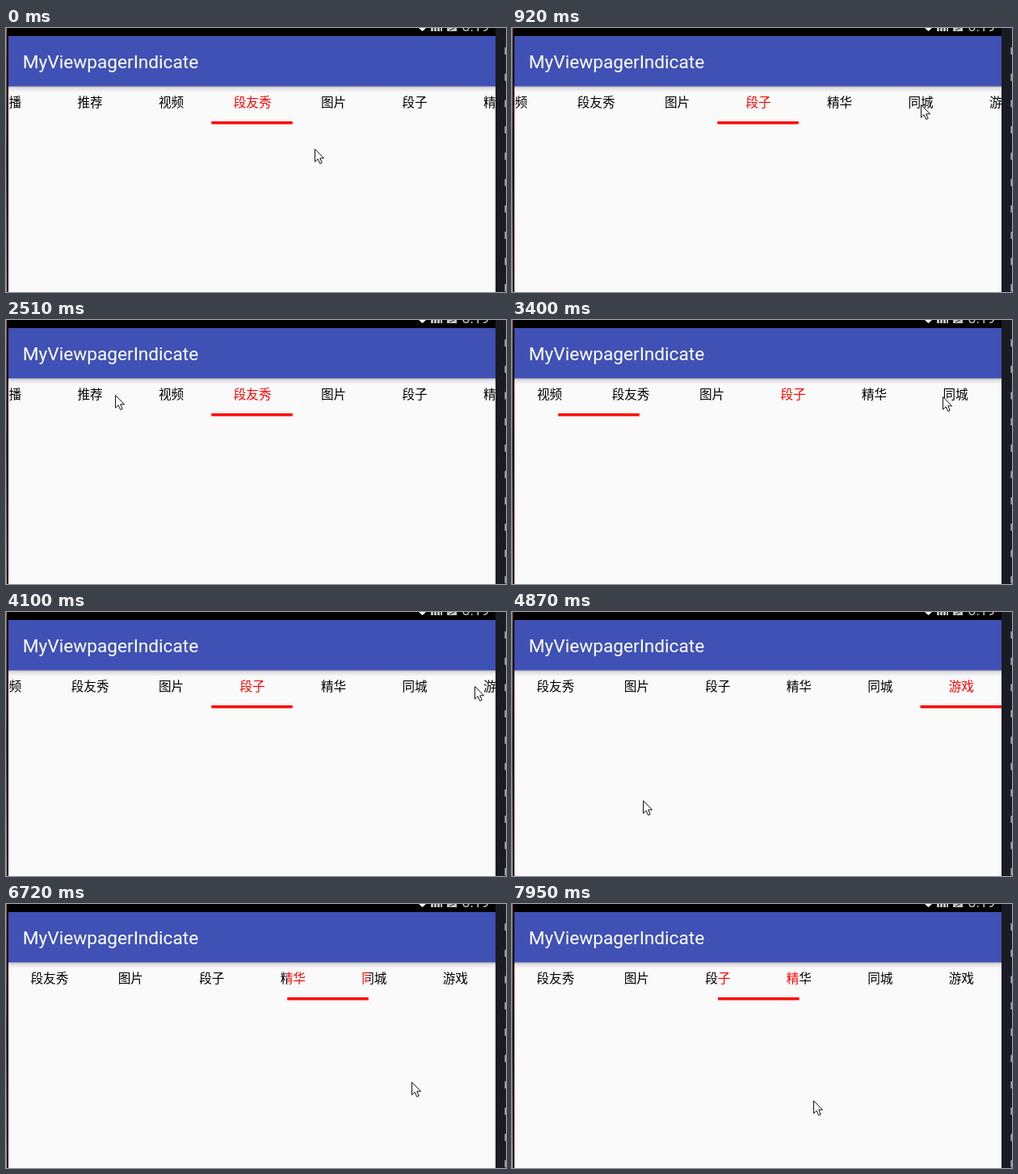
Write an HTML page that moves like this. It is 619 px wide and 328 px high and loops after 8000 ms.

```html
<!DOCTYPE html>
<html lang="zh-CN">
<head>
<meta charset="utf-8">
<style>
html, body { margin: 0; width: 100%; height: 100%; overflow: hidden; background: #fafafa; }
svg { display: block; width: 619px; height: 328px; }
.latin { font-family: Roboto, sans-serif; }
.tabs { font: 15.6px "Noto Sans CJK SC", "Noto Sans CJK", sans-serif; text-anchor: middle; }
</style>
</head>
<body>
<svg viewBox="0 0 619 328">
  <defs>
    <linearGradient id="shade" x2="0" y2="1">
      <stop stop-color="#a3a2ac"/><stop offset=".3" stop-color="#dddce0"/>
      <stop offset="1" stop-color="#fafafa"/>
    </linearGradient>
    <linearGradient id="edge" x2="0" y2="1">
      <stop stop-color="#a5604f"/><stop offset=".5" stop-color="#5a302e"/>
      <stop offset="1" stop-color="#c08a7a"/>
    </linearGradient>
    <clipPath id="screen"><path d="M3 0H606V328H3Z"/></clipPath>
    <clipPath id="hot"><rect id="hotRect" y="80" width="100.5" height="28"/></clipPath>
  </defs>
  <rect width="619" height="328" fill="#fafafa"/>
  <rect y="72" width="619" height="8" fill="url(#shade)"/>
  <rect y="10" width="619" height="62.4" fill="#3f51b5"/>
  <rect width="619" height="10"/>
  <g fill="#c4c4c4">
    <path d="M511 0H520L515.5 4Z" fill="#fff"/>
    <path d="M526 2H540" stroke="#c4c4c4" stroke-width="4" stroke-dasharray="3 1"/>
    <path d="M546 0H558V4H546Z"/>
    <path d="M549 3L555 0" stroke="#222"/>
    <text class="latin" x="564.5" y="3.5" font-size="17.6">8:19</text>
  </g>
  <text class="latin" x="20.8" y="50" font-size="22.65" fill="#fff">MyViewpagerIndicate</text>
  <g clip-path="url(#screen)">
    <g id="strip" class="tabs">
      <g id="plain"></g>
      <g clip-path="url(#hot)" fill="red">
        <rect y="83" width="910" height="20" fill="#fafafa"/>
        <g id="red"></g>
      </g>
      <rect id="bar" y="116" width="100.5" height="3.5" fill="red"/>
    </g>
  </g>
  <rect width="3" height="328" fill="#0d0a0b"/>
  <rect width="1" height="328" fill="url(#edge)"/>
  <rect x="606" width="13" height="328" fill="#1b1b24"/>
  <path d="M618.2 24V328" stroke="#a5a5ad" stroke-width="1.6" stroke-dasharray="9 23.7"/>
  <path id="cursor" d="M.5 .5V16.2L4.1 12.8L6.7 18.5L9.2 17.4L6.7 11.8H11.5Z" fill="#fff" stroke="#111"/>
</svg>
<script>
const $ = id => document.getElementById(id);
const LOOP = 8000, LEFT = 3, VIEW = 603, W = VIEW / 6, SLOP = 31, SETTLE = 170;
const START = { x: 382, y: 150, tab: 3 };
const names = ['直播', '推荐', '视频', '段友秀', '图片', '段子', '精华', '同城', '游戏'];
const labels = names.map((s, i) => `<text x="${(i + .5) * W + .6}" y="98">${s}</text>`).join('');
$('plain').innerHTML = $('red').innerHTML = labels;

// Taps jump to a tab; swipes (with an end point) drag the pages.
const gestures = [
  { press: 630, leave: 857, x: 528, y: 95, tab: 5 },
  { press: 1490, leave: 2000, x: 108, y: 88, tab: 3 },
  { press: 2515, leave: 2520, x: 135, y: 93, tab: 1 },
  { press: 3329, leave: 3600, x: 533, y: 95, tab: 5 },
  { press: 4270, leave: 4290, x: 580, y: 92, tab: 8 },
  { press: 4870, leave: 5270, x: 162, y: 234, tab: 7, end: { x: 480, y: 236 } },
  { press: 6390, leave: 6757, x: 130, y: 243, tab: 6, end: { x: 512, y: 220 } },
  { press: 7400, leave: 8000, x: 45, y: 254, tab: 5, end: { x: 379, y: 244 } }
];

const clamp = (v, a, b) => Math.min(b, Math.max(a, v));
const mix = (a, b, k) => a + (b - a) * k;
const smooth = k => k * k * (3 - 2 * k);
const quintic = k => 1 - (1 - clamp(k, 0, 1)) ** 5;
const fluid = x => x < 1 ? x - 1 + Math.exp(-x) : 1 / Math.E + (1 - Math.exp(1 - x)) * (1 - 1 / Math.E);
const viscous = k => fluid(8 * clamp(k, 0, 1)) / fluid(8);
const centred = tab => clamp((tab + .5) * W - VIEW / 2, 0, 3 * W);

function glide(a, b, t, from, to) {
  const k = smooth(clamp((t - from) / (to - from), 0, 1));
  return { x: mix(a.x, b.x, k), y: mix(a.y, b.y, k) };
}

// The pointer arrives a little before each press and rests there.
function pointer(t) {
  let at = START, left = 30;
  for (const g of gestures) {
    if (t < g.press) return glide(at, g, t, left, g.press - SETTLE);
    at = g.end || g;
    left = g.leave;
    if (t < left) return glide(g, at, t, g.press, left);
  }
  return at;
}

function pager(t) {
  let from = START.tab, s = { bar: from, hot: from, scroll: centred(from) };
  for (const g of gestures) {
    if (t < g.press) break;
    if (g.end) {
      const moved = pointer(Math.min(t, g.leave)).x - g.x - SLOP;
      const held = from - Math.max(0, moved) / VIEW;
      const bar = mix(held, g.tab, quintic((t - g.leave) / 300));
      s = { bar, hot: bar, scroll: centred(bar) };
    } else {
      const time = (Math.abs(g.tab - from) + 1) * 100;
      s = {
        bar: mix(from, g.tab, quintic((t - g.press - 23) / time)),
        hot: g.tab,
        scroll: mix(centred(from), centred(g.tab), viscous((t - g.press) / 250))
      };
    }
    from = g.tab;
  }
  return s;
}

function draw(now) {
  const t = now % LOOP, s = pager(t), { x, y } = pointer(t);
  $('strip').setAttribute('transform', `translate(${LEFT - s.scroll})`);
  $('bar').setAttribute('x', s.bar * W);
  $('hotRect').setAttribute('x', s.hot * W);
  $('cursor').setAttribute('transform', `translate(${Math.round(x)} ${Math.round(y)})`);
  requestAnimationFrame(draw);
}
draw(performance.now());
</script>
</body>
</html>
```
